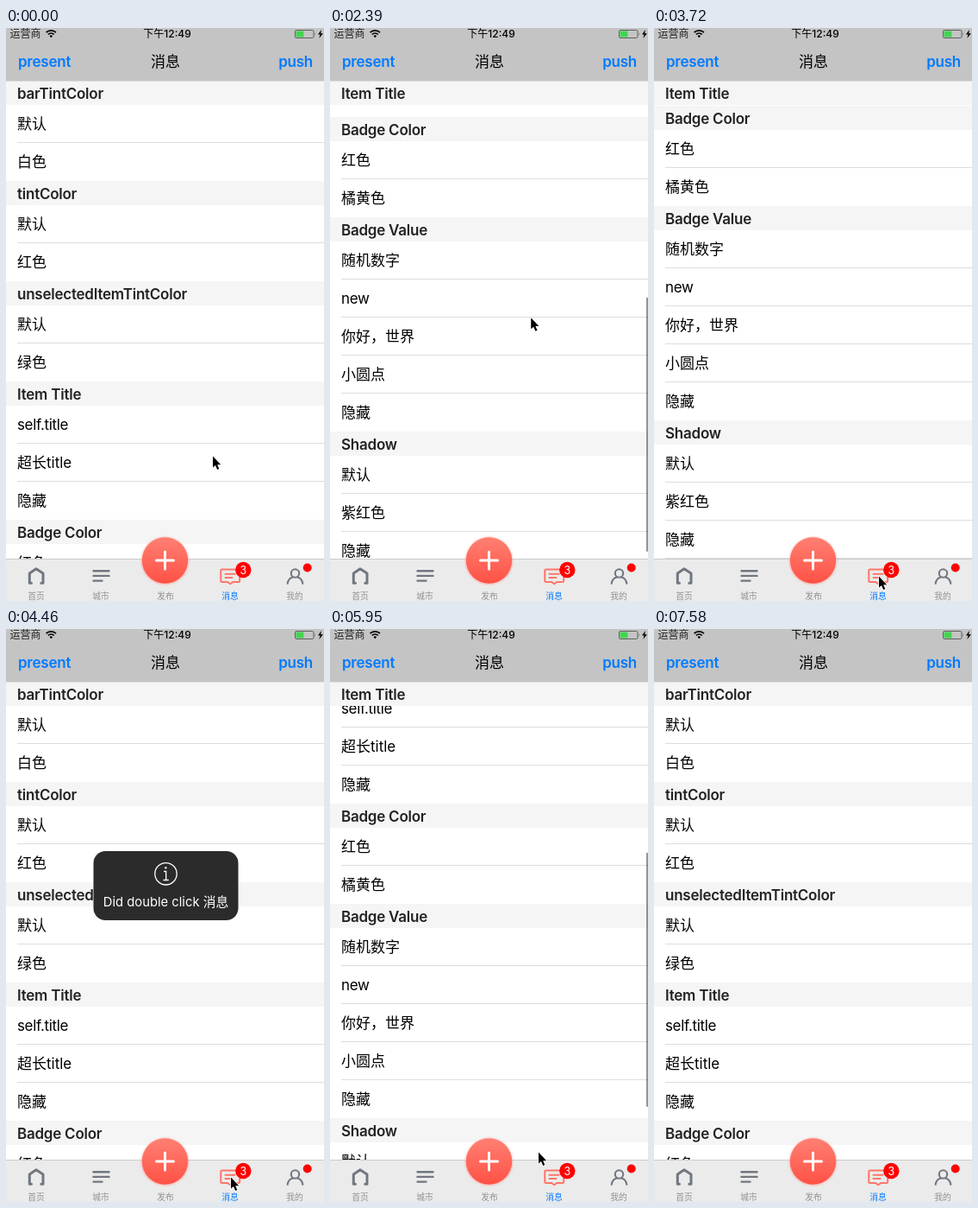
These frames come from a looping animation (369x663 px, 8160 ms). An HTML page:

```html
<!DOCTYPE html>
<html lang="zh-CN">
<head>
<meta charset="utf-8">
<style>
  html, body { margin: 0; width: 100%; height: 100%; overflow: hidden; background: #fff; }
  svg { display: block; width: 369px; height: 663px; font: 17px Inter, "Noto Sans CJK SC", "Noto Sans CJK", sans-serif; }
  .latin { letter-spacing: -.35px; }
  .bold { font-weight: 600; letter-spacing: -.24px; }
  .medium { font-weight: 500; }
  .mid { text-anchor: middle; }
  .small { font-size: 12px; }
  .tab { font-size: 9.8px; fill: #929292; text-anchor: middle; }
  .line { fill: none; stroke: #717780; stroke-width: 2.4; stroke-linecap: round; stroke-linejoin: round; }
</style>
</head>
<body>
<svg viewBox="0 0 369 663">
  <defs>
    <clipPath id="view"><rect y="61" width="369" height="553"/></clipPath>
    <linearGradient id="coral" x2="0" y2="1">
      <stop stop-color="#ff8073"/><stop offset="1" stop-color="#ff5145"/>
    </linearGradient>
    <filter id="soft" x="-30%" y="-30%" width="160%" height="160%"><feGaussianBlur stdDeviation="1.3"/></filter>
  </defs>
  <rect width="369" height="663" fill="#fff"/>
  <g clip-path="url(#view)">
    <g id="rows"></g>
    <g id="headers"></g>
    <rect id="bar" x="367" width="2" rx="1"/>
  </g>

  <rect width="369" height="61.5" fill="#c4c4c4"/>
  <text class="small" x="4.5" y="11.3" fill="#222">运营商</text>
  <path d="M46.6 5.2a8 8 0 0 1 11.4 0M48.8 7.5a5 5 0 0 1 7 0" fill="none" stroke="#000" stroke-width="1.7"/>
  <path d="M52.3 11.2l-1.8-2a2.6 2.6 0 0 1 3.6 0z"/>
  <text class="small medium mid" x="187" y="11.3">下午12:49</text>
  <rect x="335.5" y="2.5" width="21.5" height="9" rx="1.6" fill="none" stroke="#555" stroke-width=".9"/>
  <rect x="336.5" y="3.5" width="9" height="7" fill="#43d551"/>
  <path d="M358.2 5.3q1.3 1.6 0 3.3z" fill="#555"/>
  <path d="M366 2l-4 5.6h2.6L363.3 12l4.6-5.8h-2.7z"/>
  <text class="bold" x="14" y="45" fill="#007aff">present</text>
  <text class="medium mid" x="185" y="45.3">消息</text>
  <text class="bold" x="356" y="45" fill="#007aff" text-anchor="end">push</text>

  <rect y="614" width="369" height="49" fill="#ebebeb"/>
  <path d="M0 614.5H369" stroke="#cbcbcb"/>
  <circle cx="184.5" cy="616.5" r="27.7" fill="#ff8c80" opacity=".5" filter="url(#soft)"/>
  <circle cx="184.5" cy="616" r="26.7" fill="url(#coral)"/>
  <path d="M174.5 616h20M184.5 606v20" stroke="#fff" stroke-width="3" stroke-linecap="round"/>
  <path class="line" style="stroke-width:3" d="M29.5 642.2H27.3V631L35 625.8L43 631V642.2H40.8"/>
  <path class="line" d="M101.5 628.2h18M101.5 633.9h18M101.5 639.6h10"/>
  <path class="line" style="stroke:#ff7568;stroke-width:2" d="M250.5 626.5h19.5q1.2 0 1.2 1.2v12q0 1.2-1.2 1.2h-6.5l-3.3 2.3l-3.3-2.3h-6.4q-1.2 0-1.2-1.2v-12q0-1.2 1.2-1.2zM254.5 631.7h11M254.5 636h8"/>
  <g class="line" style="stroke-width:2.1">
    <circle cx="335.5" cy="631" r="4.7"/>
    <path d="M326.7 642.8q1-6 6-7.2M344.3 642.8q-1-6-6-7.2"/>
  </g>
  <circle cx="275.3" cy="627" r="9.2" fill="#f00"/>
  <text class="mid" style="font-size:12.5px" x="275.3" y="631.5" fill="#fff">3</text>
  <circle cx="349.7" cy="624.5" r="5" fill="#f00"/>
  <g id="tabs"></g>

  <g id="hud">
    <rect x="101.5" y="257" width="168" height="80" rx="14" fill="#2b2b2b"/>
    <g fill="none" stroke="#fff" stroke-width="1.3">
      <circle cx="185.5" cy="283.3" r="12.7"/>
      <path d="M183 280.5h2.7v10M182.5 290.5h6.3"/>
    </g>
    <circle cx="185.3" cy="276.3" r="1.2" fill="#fff"/>
    <text class="mid" style="font-size:14.8px" x="185.5" y="320.5" fill="#fff">Did double click 消息</text>
  </g>
  <path id="cursor" d="M0 .5V13.5L3 10.9L5.2 16L7.3 15.1L5.2 10.2H9.2z" stroke="#fff" stroke-width="1.6" stroke-linejoin="round" paint-order="stroke"/>
</svg>
<script>
const LOOP = 8160, STEP = 148.2, LEAD = 8;   // the screen refreshes every STEP ms
const TOP = 61, VIEW = 553, HEAD = 28, ROW = 44, LIMIT = 479;
const PRESSED = '超长title', PRESS_STEP = 11, CURSOR_GONE = 51;
const sections = [
  ['barTintColor', '默认', '白色'],
  ['tintColor', '默认', '红色'],
  ['unselectedItemTintColor', '默认', '绿色'],
  ['Item Title', 'self.title', PRESSED, '隐藏'],
  ['Badge Color', '红色', '橘黄色'],
  ['Badge Value', '随机数字', 'new', '你好，世界', '小圆点', '隐藏'],
  ['Shadow', '默认', '紫红色', '隐藏']
];

// Times in steps: swipe begins, glide lasts, double click sends the list home.
const swipes = [
  { start: 11, glide: 6, home: 27 },
  { start: 34, glide: 11.6, home: 45 }
];

const REST = { x: 225, y: 522 }, TAB = { x: 261, y: 634 };
const cursorPath = [
  { step: 4, x: 240, y: 495 }, { step: 6, ...REST },
  { step: 11, ...REST }, { step: 15, x: 230, y: 300 }, { step: 20, ...TAB },
  { step: 31, ...TAB }, { step: 34, x: 236, y: 515 }, { step: 37, x: 236, y: 350 },
  { step: 40, x: 242, y: 605 }, { step: 42, ...TAB }
];

const $ = id => document.getElementById(id);
const clamp = v => Math.max(0, Math.min(1, v));
const smooth = v => { const t = clamp(v); return t * t * (3 - 2 * t); };
const easeOut = v => 1 - (1 - clamp(v)) ** 2;
const move = (node, x, y) => node.setAttribute('transform', `translate(${x} ${y})`);
const fade = (node, opacity) => node.setAttribute('opacity', opacity);

function add(parent, tag, attrs, text) {
  const node = document.createElementNS('http://www.w3.org/2000/svg', tag);
  for (const key in attrs) node.setAttribute(key, attrs[key]);
  if (text) node.textContent = text;
  return parent.appendChild(node);
}

function scrollOffset(step, { start, glide, home }) {
  const past = Math.max(0, step - start - glide);
  const bounce = 30 * past * Math.exp(-past);
  const pulled = LIMIT * easeOut((step - start) / glide) + bounce;
  return Math.round(pulled * (1 - smooth((step - home) / 3)));
}

function barOpacity(step, { start, glide, home }) {
  return step > home ? 0 : .42 * clamp(step - start) * clamp((start + glide + 8 - step) / 3);
}

const hudOpacity = (step, { home }) => clamp((step - home) / 2) * clamp((home + 6 - step) / 2);

function cursorAt(step) {
  const next = cursorPath.findIndex(point => point.step > step);
  if (next < 1) return cursorPath.at(next);
  const a = cursorPath[next - 1], b = cursorPath[next];
  const t = smooth((step - a.step) / (b.step - a.step));
  return { x: a.x + (b.x - a.x) * t, y: a.y + (b.y - a.y) * t };
}

const spacing = text => /^[\x20-\x7e]+$/.test(text) ? 'latin' : '';
let y = TOP, highlight;
const headers = sections.map(([title, ...items], s) => {
  const top = y;
  const node = add($('headers'), 'g', {});
  add(node, 'rect', { width: 369, height: HEAD, fill: '#f5f5f5' });
  add(node, 'text', { x: 13, y: 20.5, class: 'bold', fill: '#222' }, title);
  y += HEAD;
  items.forEach((item, i) => {
    if (item === PRESSED) highlight = add($('rows'), 'rect', { y, width: 369, height: ROW, fill: '#d8d8d8' });
    add($('rows'), 'text', { x: 13, y: y + 28, class: spacing(item) }, item);
    y += ROW;
    if (i < items.length - 1 || s === sections.length - 1)
      add($('rows'), 'rect', { x: 13, y: y - 1, width: 356, height: 1, fill: '#dddddf' });
  });
  return { node, top, end: y };
});
const content = y - TOP;

['首页', '城市', '发布', '消息', '我的'].forEach((label, i) =>
  add($('tabs'), 'text', { x: 35 + i * 75, y: 660.6, class: 'tab', style: i === 3 ? 'fill:#007aff' : '' }, label));

function draw(time) {
  const step = Math.max(0, Math.floor((time % LOOP - LEAD) / STEP));
  const swipe = swipes.findLast(s => step >= s.start) || swipes[0];
  const offset = scrollOffset(step, swipe);

  move($('rows'), 0, -offset);
  for (const { node, top, end } of headers)
    move(node, 0, Math.max(top - offset, Math.min(TOP, end - offset - HEAD)));
  fade(highlight, step === PRESS_STEP ? 1 : 0);

  const barTop = TOP + offset * VIEW / content + 1;
  $('bar').setAttribute('y', barTop);
  $('bar').setAttribute('height', Math.min(VIEW * VIEW / content - 2, TOP + VIEW - 2 - barTop));
  fade($('bar'), barOpacity(step, swipe));

  fade($('hud'), hudOpacity(step, swipe));
  const { x, y } = cursorAt(step);
  move($('cursor'), x, y);
  fade($('cursor'), step < CURSOR_GONE ? 1 : 0);
}

const start = performance.now();
function tick() {
  draw(performance.now() - start);
  requestAnimationFrame(tick);
}
tick();
</script>
</body>
</html>
```
